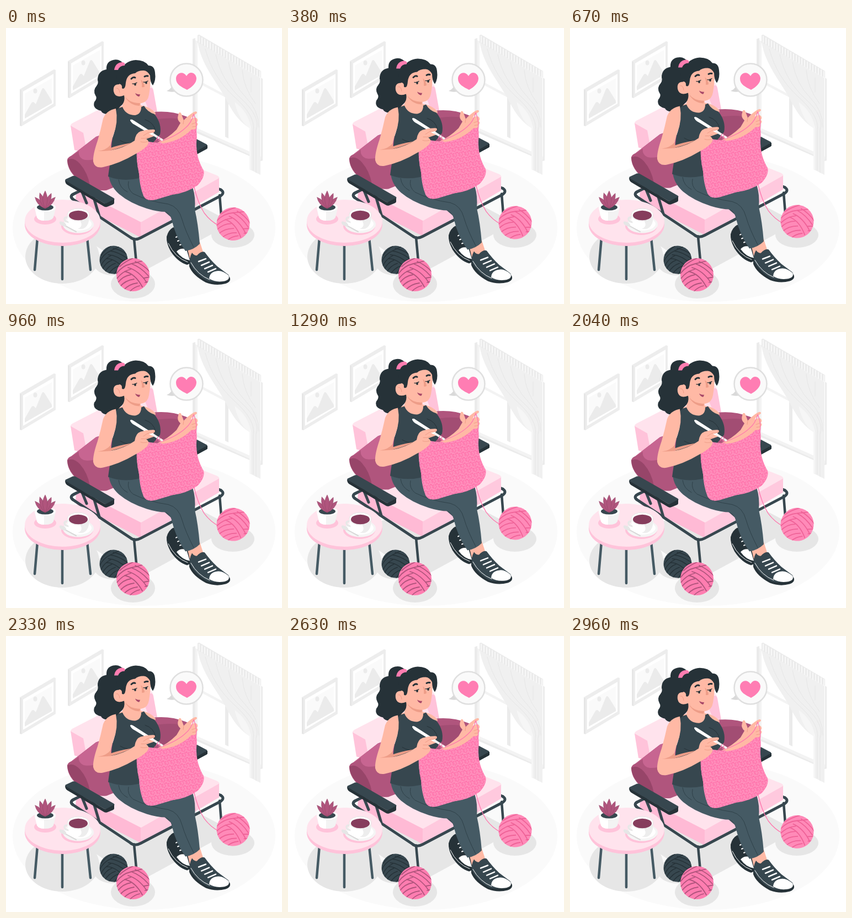
An HTML page that plays this animation: 500 by 500 pixels, repeating every 3000 ms.

```html
<!DOCTYPE html>
<html lang="en">
<head>
<meta charset="utf-8">
<title>Knitting</title>
<style>
html, body { margin: 0; width: 100%; height: 100%; overflow: hidden; background: #fff; }
svg { display: block; width: 100vw; height: 100vh; }
.line { fill: none; stroke-linecap: round; stroke-linejoin: round; }
.skin { fill: #ffb9a5; }
.shade { fill: #ee9d88; }
.ink { fill: #263238; }
.slate { fill: #37474f; }
</style>
</head>
<body>
<svg viewBox="0 0 500 500">
<defs>
  <pattern id="stitches" width="11" height="10" patternUnits="userSpaceOnUse" patternTransform="rotate(-8)">
    <path class="line" stroke="#ffa9cb" stroke-width="1" d="M1 2q2-2 3 0t-2 3M6 1q3-1 3 1t-2 2M5 8q0-3 3-2t2-1M0 8l2-1 1 2M10 9l1-2"/>
  </pattern>
  <path id="fabric" d="M237 209Q247 202 259 206Q281 211 302 202Q326 192 343 178Q347 191 345 207Q344 235 358 258Q361 270 347 285Q327 299 301 302Q284 307 271 311Q254 315 249 304Q242 286 241 264Q235 239 237 209z"/>
  <clipPath id="ballClip"><circle r="30"/></clipPath>
  <g id="strands" class="line" clip-path="url(#ballClip)">
    <path d="M-30-2Q-20-16-3-20T20-26M-30 8Q-20-6-4-10M-24-15Q-14-24 0-30M-3-20Q14-14 28 2M4-24Q19-18 31-5M-9-13Q10-8 25 14M-15-6Q4-2 17 22M-28 15Q-18 2-4 0M-24 22Q-14 10 2 8M-17 28Q-8 17 8 15M-6 31Q0 23 12 20M20 6L31 4M22 14L30 12"/>
  </g>
  <path id="leaf" d="M0 0Q-9-17 0-32Q8-16 0 0z"/>
</defs>

<ellipse cx="250" cy="362" rx="238" ry="134" fill="#fafafa"/>

<g id="wall">
  <g id="picture">
    <path fill="#e6e6e6" d="M25 111l3 1v66l-3-1z"/>
    <path fill="#ededed" d="M25 111L87 75l3 1v65L28 178V112z"/>
    <path fill="#fff" d="M31 115l55-32v54L31 170z"/>
    <path fill="#fafafa" d="M34 119l49-28v45L34 164z"/>
    <path fill="#ebebeb" d="M34 164V157L46 136q3-4 6 0l2 2L65 111q2-4 5 0l13 21v4z"/>
    <ellipse cx="53" cy="114" rx="3.500" ry="4.500" fill="#ebebeb"/>
  </g>
  <use href="#picture" x="87" y="-51"/>
  <path fill="#ebebeb" d="M338 20l5-2v166l119 54V91l3 2v147l-3 1L338 187z"/>
  <path fill="#f3f3f3" d="M343 22l4 2v161l-4-2zM343 92l57 30v5L343 97zM343 180l119 53v6L343 185z"/>
  <path fill="#ebebeb" d="M397 120h6v80l-6-3z"/>
  <path fill="#f0f0f0" d="M347 25L461 89V266L441 256V181C418 167 407 145 397 126C377 91 354 66 347 25z"/>
  <path class="line" stroke="#e6e6e6" d="M361 38Q375 90 414 125T448 187V258M380 48Q390 95 426 128T453 185V262M403 62Q410 101 434 125T458 180M428 76Q430 108 452 137M444 90V116"/>
  <path fill="#f6f6f6" d="M414 134Q438 150 444 181V257L441 256V181Q423 170 414 134z"/>
  <path fill="#ebebeb" d="M347 13l3-1 112 66v12L347 26z"/>
  <path class="line" id="pleats" stroke="#f8f8f8" stroke-width="2"/>
  <path fill="#ececec" d="M462 90l3 2v147l-3-1z"/>
</g>

<g fill="#e6e6e6">
  <ellipse cx="102" cy="414" rx="67" ry="49"/>
  <path d="M132 364L268 287Q277 282 287 288L397 346Q407 352 397 360L254 438Q241 446 228 438L132 374Q127 369 132 364z"/>
  <ellipse cx="192" cy="426" rx="33" ry="22"/>
  <ellipse cx="230" cy="464" rx="40" ry="26"/>
  <ellipse cx="411" cy="375" rx="39" ry="23"/>
</g>

<g id="floating">
  <!-- armchair -->
  <path class="line" stroke="#37474f" stroke-width="4.500" d="M387 303l3 37M232 382l4 43"/>
  <path class="slate" d="M330 199l15 2 19 10v8l-23 12z"/>
  <path class="ink" d="M365 212v6l-23 13v-6z"/>
  <path fill="#ffe3ed" d="M117 178Q116 175 121 172L253 104Q263 99 266 110L278 190 186 236 140 214z"/>
  <path fill="#ffc3da" d="M117 177l23 13 7 37-23-6zM245 116L260 109Q266 107 267 113L274 152 258 147z"/>
  <path fill="#b0557d" d="M262 153Q295 148 326 160Q342 166 345 185L334 226 264 224z"/>
  <path fill="#a24d73" d="M275 165Q301 161 331 167Q343 180 326 199L280 213z"/>
  <path class="line" stroke="#37474f" stroke-width="5" d="M149 288L122 301Q115 305 121 310M366 284L389 293"/>
  <path fill="#ffe3ed" d="M128 292L258 226Q270 222 284 228L382 267Q388 270 386 274L247 354z"/>
  <path fill="#ffbad5" d="M128 292L245 352V380L131 321Q126 318 126 311z"/>
  <path fill="#ffc9de" d="M244 352L386 272V297L244 380z"/>
  <path class="line" stroke="#37474f" stroke-width="5" d="M149 288L122 301Q115 305 121 310L225 379Q233 386 244 380L389 304Q397 298 389 293"/>
  <!-- cushion -->
  <path fill="#b0557d" d="M111 241Q110 235 119 231L163 197Q178 189 207 205L217 280 182 294Q154 296 133 277Q112 260 111 241z"/>
  <path fill="#c76591" d="M119 231L163 197Q181 190 199 204L197 231Q158 250 119 231z"/>
  <path fill="#b0557d" d="M132 223Q130 234 142 239Q168 242 197 217V240L140 249Q126 238 113 236z"/>
  <path fill="#974569" d="M111 239Q122 233 134 246Q148 262 152 285Q113 268 111 239z"/>
  <path class="line" stroke="#37474f" stroke-width="5" d="M135 290l11 27M158 304l11 37"/>
  <path class="slate" d="M108 274l13-6q3-1 6 1l68 39q3 2 0 4l-12 6q-3 1-6-1l-68-39q-3-2-1-4z"/>
  <path class="ink" d="M107 276l70 41q3 2 6 0l13-7v7q0 2-3 3l-10 4q-3 1-6-1l-66-39q-4-3-4-8z"/>

  <!-- legs and shoes -->
  <path class="ink" d="M303 361Q294 366 291 378Q290 389 298 404Q311 424 328 429L335 426 329 395 321 370z"/>
  <path class="line" stroke="#fff" stroke-width="2" d="M308 379l6-3M311 386l7-3M315 393l8-3"/>
  <path fill="#fff" d="M309 405Q316 397 327 401L333 421Q319 419 309 405z"/>
  <path class="line" stroke="#fff" stroke-width="1" d="M294 390Q306 416 329 424"/>
  <path class="skin" d="M328 397l23-10 7 22-15 16-10-7z"/>
  <path fill="#3b4d56" d="M276 323l34 7 20 29-14 18-11-18q-2-14-8-18z"/>
  <path fill="#455a64" d="M186 266Q188 286 205 301Q224 317 255 327Q274 333 290 333Q297 336 300 347Q308 381 325 404Q340 402 351 391Q348 354 342 329Q344 307 338 288L296 264 240 255z"/>
  <path class="line" stroke="#2f4149" d="M204 275Q206 290 220 297M222 278Q219 291 230 300Q258 314 294 319Q313 324 319 347Q325 368 340 397"/>
  <path class="slate" d="M333 418Q334 412 337 407Q341 413 346 412Q354 403 360 406Q370 420 383 432L403 447Q408 456 400 461Q382 467 366 460Q344 449 333 428z"/>
  <path class="ink" d="M332 425Q344 448 367 459Q390 463 405 451Q409 459 398 463Q380 468 362 461Q338 448 332 432z"/>
  <path fill="#fff" d="M368 454Q369 441 384 440Q392 439 403 448Q407 457 393 459Q379 461 368 454z"/>
  <path class="line" stroke="#fff" stroke-width="2.500" d="M349 423l13-5M354 430l14-6M360 436l14-6M366 442l14-6"/>
  <path class="line" stroke="#fff" stroke-width="1" d="M335 425Q347 447 369 456"/>

  <!-- body -->
  <path class="skin" d="M197 146L211 141 213 117 243 130 244 140Q262 143 271 154L266 174 218 173z"/>
  <path class="shade" d="M216 125Q226 137 243 136L242 141Q224 140 216 125z"/>
  <path class="slate" d="M198 147L211 143Q217 158 234 158Q245 156 245 143L250 141Q256 152 269 156Q283 174 279 193Q260 216 240 235L242 272Q211 279 185 269Q188 246 191 231Q190 214 193 199Q203 172 198 147z"/>
  <path class="line" stroke="#263238" d="M207 204Q219 211 232 209M252 166Q268 171 271 187"/>

  <!-- head -->
  <path class="ink" d="M214 66Q206 55 194 58Q181 61 182 75Q166 78 166 94Q168 100 164 105Q157 113 162 122Q166 127 160 134Q156 146 172 150Q176 158 190 155Q201 150 207 142Q218 134 213 118L222 75z"/>
  <path class="skin" d="M214 83L260 74Q264 94 259 121Q257 134 246 136Q229 138 214 122Q198 128 195 115Q193 102 205 102z"/>
  <path class="line" stroke="#ee9d88" d="M200 109q5-1 6 8"/>
  <path class="ink" d="M207 76Q217 59 235 58Q251 58 258 68Q269 68 270 81Q272 95 266 104Q261 98 261 86Q256 77 249 77Q239 77 234 82Q219 83 217 99Q216 113 210 109Q211 102 205 101Q195 86 207 76z"/>
  <path fill="#ff7db0" d="M196 76Q198 63 210 62Q217 62 215 68Q206 68 203 76z"/>
  <path class="line" stroke="#263238" stroke-width="3" d="M227 92q4-4 7-2M251 88q3-2 6-1"/>
  <path class="line" stroke="#263238" stroke-width="1.300" d="M229 101q4 1 8-2M249 98q4 1 8-2"/>
  <ellipse class="ink" cx="234" cy="102" rx="1.800" ry="2.500"/>
  <ellipse class="ink" cx="254" cy="99" rx="1.800" ry="2.500"/>
  <path class="shade" d="M244 94q4 1 7 11q0 3-5 2q1-7-2-13z"/>
  <path fill="#a84868" d="M234 118q5 3 9 2q-1 5-3 4q-4-1-6-6z"/>

  <!-- far arm -->
  <path class="skin" d="M274 208Q293 200 309 184L316 172Q309 166 312 158Q313 151 317 154L322 167Q331 158 339 153Q346 149 346 154L336 162 330 186Q318 201 311 207L282 218z"/>
  <path class="line" stroke="#ee9d88" d="M322 167l-1 7"/>

  <!-- knitting -->
  <use href="#fabric" fill="#ff78ae"/>
  <use href="#fabric" fill="url(#stitches)"/>
  <path class="skin" d="M278 204Q303 200 320 186L333 167Q342 160 346 164Q349 168 345 171Q350 174 345 178Q346 185 336 184Q314 206 283 209z"/>
  <path class="line" stroke="#ee9d88" d="M345 171l-8 3M345 178l-7 1"/>
  <path class="line" stroke="#ff78ae" stroke-width="1.300" d="M340 156Q336 172 325 181Q309 196 278 206M340 156Q347 171 344 190M340 285Q347 316 359 335Q371 351 386 358"/>

  <!-- near arm and hook -->
  <path class="skin" d="M199 146Q182 149 176 164Q172 183 166 204Q157 230 158 242Q161 255 176 252Q205 246 235 228Q248 221 255 214Q262 206 254 201L268 196Q271 193 267 190L270 187Q268 184 258 185L244 187Q235 190 233 204Q213 218 188 222Q190 207 194 195Q204 171 199 146z"/>
  <path class="shade" d="M190 211Q181 222 166 223Q179 223 188 222Q213 216 227 208Q204 212 190 217z"/>
  <path fill="#f3f3f3" d="M225 167Q226 164 232 168L285 202 283 205 233 175Q227 172 225 167z"/>
  <path fill="#fff" d="M225 167Q226 164 232 168L266 190 264 194 233 175Q227 172 225 167z"/>
  <path class="skin" d="M237 193Q245 184 263 184Q270 183 270 186Q267 190 258 191L249 195Q256 194 260 196Q258 201 251 201Q258 202 257 206Q250 212 241 213z"/>
  <path class="line" stroke="#ee9d88" d="M269 187q-6 4-12 3l-8 5M258 198q-6 3-13 2M256 206q-7 2-12 0"/>
  <path class="line" stroke="#ff78ae" stroke-width="1.500" d="M275 197l-2 5M279 199l-2 5"/>

  <g id="sideBall"></g>
</g>

<g id="darkBall"></g>
<g id="frontBall"></g>

<g id="table">
  <path class="line" stroke="#455a64" stroke-width="4.500" d="M57 380l-5 58M147 380l6 58M102 390v65"/>
  <path fill="#ffc3da" d="M34 350h137v6a68.500 39 0 0 1-137 0z"/>
  <ellipse cx="102.500" cy="350" rx="68.500" ry="39" fill="#ffe3ed"/>
  <ellipse cx="71" cy="346" rx="20" ry="10" fill="#ffc3da"/>
  <path fill="#f3f3f3" d="M52 326h38l-4 17q-3 6-15 6t-15-6z"/>
  <path fill="#fff" d="M52 326h17v23q-10 0-13-6z"/>
  <ellipse cx="71" cy="325" rx="19" ry="8" fill="#fff"/>
  <ellipse cx="71" cy="325" rx="15" ry="5.500" fill="#37474f"/>
  <g id="leaves" fill="#b0557d"></g>
  <ellipse cx="129" cy="359" rx="29" ry="16" fill="#ffc3da"/>
  <ellipse cx="131" cy="356" rx="28" ry="15.500" fill="#f5f5f5"/>
  <ellipse cx="131" cy="355" rx="24" ry="12" fill="#fff"/>
  <path class="line" stroke="#e8e8e8" stroke-width="3.500" d="M114 343q-9-1-8 4t13 5"/>
  <path fill="#fff" d="M111 339h40q0 22-13 25h-12q-14-3-15-25z"/>
  <path fill="#ededed" d="M134 349l17-10q0 22-13 25h-8q11-5 4-15z"/>
  <ellipse cx="131" cy="338" rx="20" ry="11" fill="#fff" stroke="#e6e6e6"/>
  <ellipse cx="131" cy="339.500" rx="17" ry="8.800" fill="#863d5d"/>
  <path class="line" stroke="#d9d9d9" stroke-width="2" d="M103 356L127 369"/>
  <ellipse cx="103" cy="355" rx="7" ry="3.500" transform="rotate(30 103 355)" fill="#e6e6e6"/>
</g>

<g id="bubble">
  <path fill="#d9d9d9" d="M302 102Q299 111 291 114Q298 117 309 115z"/>
  <circle cx="327" cy="94" r="29.500" fill="#fafafa" stroke="#dfdfdf" stroke-width="2.500"/>
  <path fill="#ff7db3" d="M327 87C321 77 308 81 308 92C308 102 318 107 328 112C337 107 345 100 345 91C344 80 332 77 327 87z"/>
</g>
</svg>
<script>
const LOOP = 3000, LIFT = 10;
const byId = id => document.getElementById(id);

function drawBall(id, x, y, radius, fill, strand, angle = 0) {
  byId(id).innerHTML =
    `<g transform="translate(${x} ${y}) rotate(${angle}) scale(${radius / 30})">
      <circle r="30" fill="${fill}"/>
      <use href="#strands" stroke="${strand}" stroke-width="1.8"/>
    </g>`;
}

drawBall('sideBall', 411.5, 355, 30, '#ff8ab8', '#ef6398', 8);
drawBall('darkBall', 195, 420, 25.5, '#37474f', '#263238', -12);
drawBall('frontBall', 230, 447, 30, '#ff7db0', '#b0557d');

byId('leaves').innerHTML = [-42, 42, -19, 22, 0].map(angle =>
  `<use href="#leaf" transform="translate(71 327) rotate(${angle}) scale(${1 - Math.abs(angle) / 300})" stroke="#8f4465" stroke-width=".5"/>`
).join('');

let pleats = '';
for (let x = 350; x < 461; x += 5) pleats += `M${x} ${15 + (x - 350) * 0.58}v11`;
byId('pleats').setAttribute('d', pleats);

const floating = byId('floating');
function render(now) {
  const phase = (now % LOOP) / LOOP;
  const rise = LIFT * (1 - Math.abs(1 - 2 * phase));
  floating.setAttribute('transform', `translate(0 ${-rise.toFixed(3)})`);
}

const start = performance.now();
function tick() {
  render(performance.now() - start);
  requestAnimationFrame(tick);
}
render(0);
requestAnimationFrame(tick);
</script>
</body>
</html>
```
